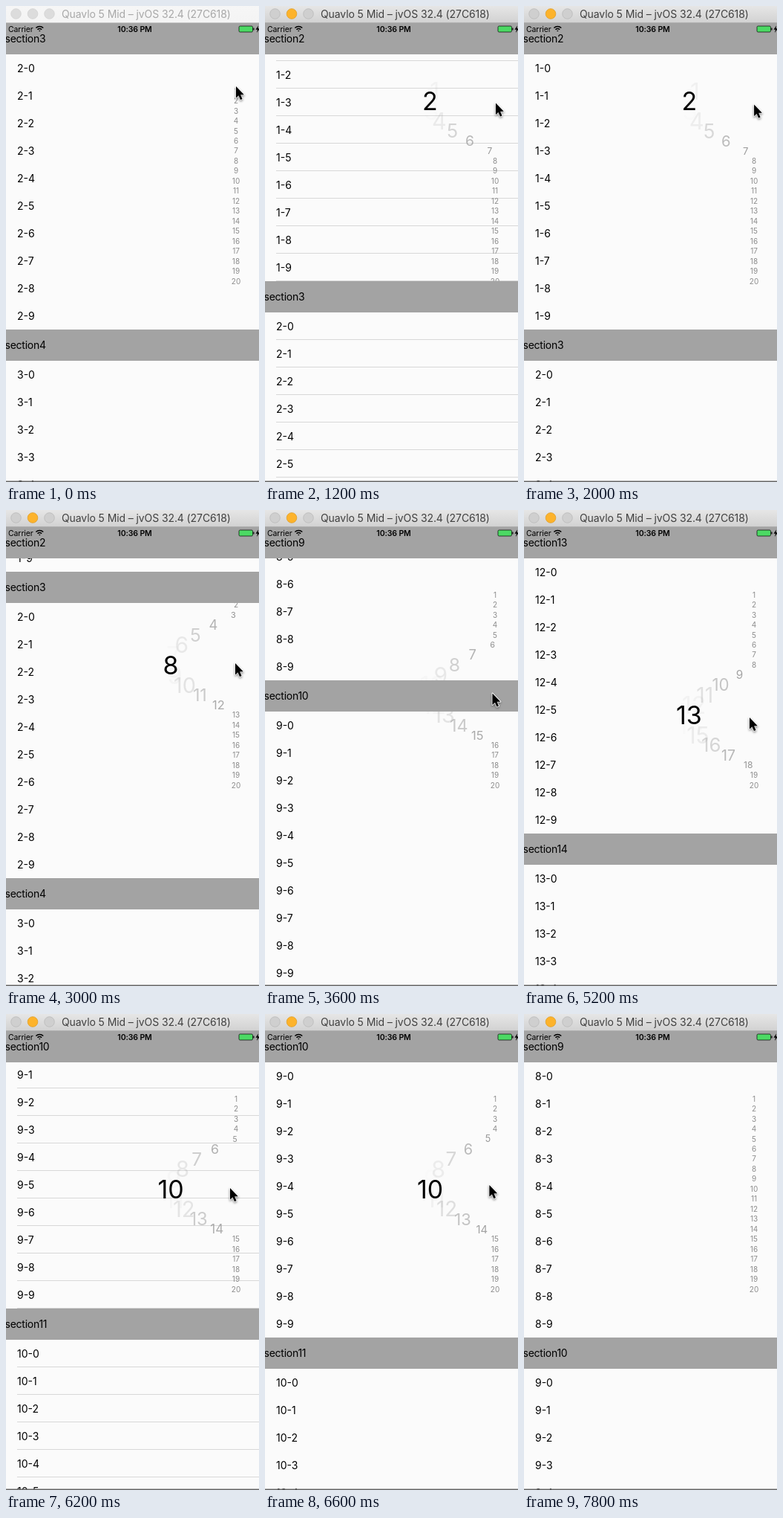
Animation of 341 by 640 pixels, one loop 8 s. Source, as an HTML page with a canvas:

```html
<!DOCTYPE html>
<html>
<head>
<meta charset="utf-8">
<style>
html, body { margin: 0; width: 100%; height: 100%; overflow: hidden; background: #fbfbfb; }
canvas { display: block; }
</style>
</head>
<body>
<canvas id="stage" width="341" height="640"></canvas>
<script>
const W = 341, H = 640, LOOP = 8000, STEP = 200;
const TOP = 23, HEAD = 42, ROW = 37, ROWS = 10, SECTIONS = 20;
const BLOCK = HEAD + ROW * ROWS;
const REACH = 67.3, PULL = 88;
const ctx = document.getElementById('stage').getContext('2d');

// Keyframes as [time, value]
const cursorX = [[0, 310], [1200, 311], [3000, 309], [4200, 304], [5200, 304], [6200, 302], [7200, 303], [7600, 355]];
const cursorY = [[0, 108], [400, 112], [1000, 128], [1200, 130.5], [2200, 133], [2600, 148], [3000, 206],
  [3400, 236], [3800, 257], [4200, 265.5], [4800, 272], [5200, 279], [5600, 268], [6000, 236], [6200, 234],
  [6600, 230], [7000, 222], [7400, 219], [7600, 214]];
const scroll = [[0, 824], [800, 824], [1000, 690], [1200, 477], [1400, 412], [2600, 412], [2800, 520], [3000, 764],
  [3200, 1660], [3400, 2884], [3800, 4120], [4000, 4480], [4200, 4532], [4800, 4532], [5000, 4850], [5200, 4944],
  [5600, 4880], [5800, 4532], [6000, 3990], [6200, 3747], [6400, 3708], [6800, 3708], [7000, 3390], [7200, 3296]];
const spread = [[0, 0], [600, 0], [1000, 1], [7200, 1], [7600, 0]];

function at(keys, t) {
  const i = keys.findIndex(k => k[0] > t);
  if (i < 0) return keys[keys.length - 1][1];
  const [t0, a] = keys[i - 1], [t1, b] = keys[i];
  return a + (b - a) * (t - t0) / (t1 - t0);
}

function rect(x, y, w, h, color) {
  ctx.fillStyle = color;
  ctx.fillRect(x, y, w, h);
}

function text(str, x, midY, size, color, { align = 'left', weight = 400, spacing = 0 } = {}) {
  ctx.font = `${weight} ${size}px Inter, "Liberation Sans", sans-serif`;
  ctx.letterSpacing = spacing + 'px';
  ctx.textAlign = align;
  ctx.fillStyle = color;
  ctx.fillText(str, x, midY + size * 0.364);
}

function drawRows(offset) {
  for (let s = 0; s < SECTIONS; s++) {
    for (let r = 0; r < ROWS; r++) {
      const y = TOP + s * BLOCK + HEAD + r * ROW - offset;
      if (y < TOP - ROW || y > H) continue;
      text(`${s}-${r}`, 15, y + ROW / 2, 14, '#000');
      // Hairlines drop out on every other scroll position
      if (offset % 2) rect(15, y + ROW - 1, W - 15, 1, '#d8d8d8');
    }
  }
}

function drawHeaders(offset) {
  for (let s = 0; s < SECTIONS; s++) {
    const natural = TOP + s * BLOCK - offset;
    if (natural <= TOP - BLOCK || natural > H) continue;
    const y = Math.max(natural, Math.min(TOP, natural + BLOCK - HEAD));
    rect(0, y, W, HEAD, '#a3a3a3');
    text('section' + (s + 1), -1.5, y + HEAD / 2, 14, '#000', { spacing: -0.25 });
  }
}

function drawIndex(touchY, amount) {
  const place = n => 114 + (n - 1) * 13.47;
  const chosen = Math.max(1, Math.min(SECTIONS, Math.round((touchY - 114) / 13.47) + 1));
  for (let n = 1; n <= SECTIONS; n++) {
    const d = Math.abs(place(n) - touchY);
    const near = d < REACH ? amount * Math.cos(Math.PI / 2 * d / REACH) : 0;
    const on = n === chosen && amount > 0.5;
    ctx.globalAlpha = on ? 1 : 1 - near;
    text(n, 310 - PULL * near, place(n), 10 + 24 * near, on ? '#000' : '#8c8c8c', { align: 'center' });
  }
  ctx.globalAlpha = 1;
}

function drawStatus() {
  rect(0, 22, W, 18, '#a3a3a3');
}

function drawStatusItems() {
  text('Carrier', 3, 31, 10.5, '#000', { spacing: -0.1 });
  text('10:36 PM', 173.5, 31, 10.5, '#000', { align: 'center', weight: 600, spacing: -0.1 });

  ctx.strokeStyle = '#000';
  ctx.lineWidth = 1.5;
  for (const r of [1, 4, 7]) {
    ctx.beginPath();
    ctx.arc(45.3, 34.5, r, -Math.PI * 0.75, -Math.PI * 0.25);
    ctx.stroke();
  }

  ctx.lineWidth = 0.7;
  ctx.fillStyle = '#4cd964';
  ctx.beginPath();
  ctx.roundRect(314, 27, 18.5, 8, 1.5);
  ctx.fill();
  ctx.stroke();
  rect(333.3, 29.5, 1.2, 3, '#000');
  shape([[340, 26.5], [336.5, 31.7], [339, 31.7], [338, 36], [342, 30.3], [339.6, 30.3]], '#000');
}

function shape(points, fill, stroke) {
  ctx.beginPath();
  points.forEach(([x, y]) => ctx.lineTo(x, y));
  ctx.closePath();
  if (stroke) {
    ctx.strokeStyle = stroke;
    ctx.lineWidth = 2;
    ctx.stroke();
  }
  ctx.fillStyle = fill;
  ctx.fill();
}

function drawTitleBar(active) {
  const g = ctx.createLinearGradient(0, 0, 0, 22);
  g.addColorStop(0, active ? '#e6e6e6' : '#f6f6f6');
  g.addColorStop(1, active ? '#d2d2d2' : '#f4f4f4');
  rect(0, 0, W, 22, g);
  rect(0, 22, W, 1, active ? '#b0b0b0' : '#c8c8c8');
  [13.5, 36, 58.5].forEach((x, i) => {
    const lit = active && i === 1;
    ctx.beginPath();
    ctx.arc(x, 10.5, 6.8, 0, 7);
    ctx.fillStyle = lit ? '#fdb32b' : active ? '#cfcfcf' : '#dcdcdc';
    ctx.fill();
    ctx.strokeStyle = lit ? '#e09e24' : active ? '#b9b9b9' : '#d2d2d2';
    ctx.lineWidth = 0.8;
    ctx.stroke();
  });
  text('Quavlo 5 Mid – jvOS 32.4 (27C618)', 75, 10.8, 14, active ? '#404040' : '#a8a8a8', { spacing: -0.1 });
}

function drawCursor(x, y) {
  ctx.save();
  ctx.translate(x, y);
  ctx.lineJoin = 'round';
  ctx.shadowColor = 'rgba(0,0,0,.3)';
  ctx.shadowBlur = 3;
  ctx.shadowOffsetY = 1.5;
  shape([[0, 0], [0, 15.5], [3.5, 12.3], [6, 18], [8.5, 17], [6, 11.3], [10.8, 11.3]], '#000', '#fff');
  ctx.restore();
}

function draw(t) {
  const x = at(cursorX, t), y = at(cursorY, t), offset = Math.round(at(scroll, t));
  rect(0, 0, W, H, '#fbfbfb');
  drawRows(offset);
  drawIndex(y + 0.5, at(spread, t));
  drawStatus();
  drawHeaders(offset);
  drawStatusItems();
  drawTitleBar(t >= STEP);
  rect(0, H - 1.5, W, 1.5, '#666');
  drawCursor(x, y);
}

function tick() {
  const t = performance.now() % LOOP;
  draw(Math.floor(t / STEP) * STEP);
  requestAnimationFrame(tick);
}
tick();
</script>
</body>
</html>
```
